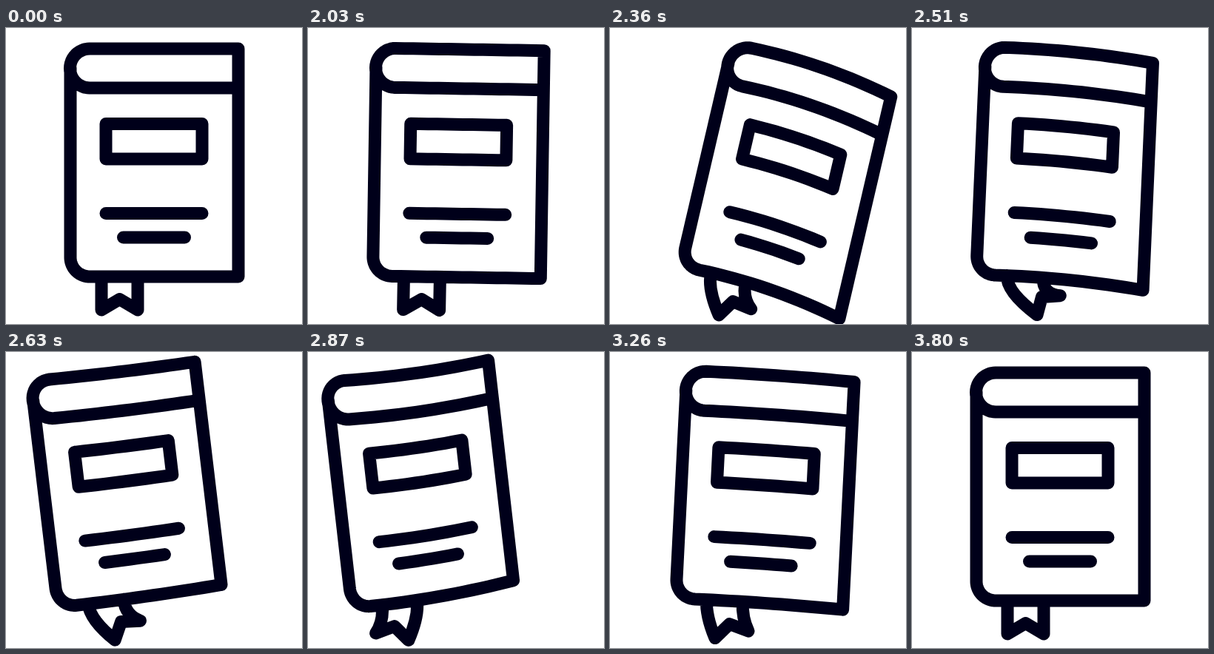
Write an HTML page with a canvas that moves like this. It is 400 by 400 pixels and loops after 3830 ms.

```html
<!DOCTYPE html>
<html lang="en">
<head>
<meta charset="utf-8">
<title>Swinging book</title>
<style>
html, body { margin: 0; width: 100%; height: 100%; overflow: hidden; background: #fff; }
canvas { display: block; width: 400px; height: 400px; }
</style>
</head>
<body>
<canvas id="stage" width="400" height="400"></canvas>
<script>
const ctx = document.getElementById('stage').getContext('2d');
const LOOP = 3830, START = 2030, STEP = 30;
const RAD = Math.PI / 180;
const PIVOT = { x: 151, y: 368 };
const FOOT = { x: 87, y: 310 }, WIDTH = 227, HEIGHT = 308;

// Turning points of each motion: [time, value]
const SWING = [[1975, 0], [2310, 14], [2710, -9], [3240, 2.9], [3640, 0]];
const DRIFT = [[2450, 0], [2800, -26], [3240, 0]];
const RIBBON = [[2000, 0], [2180, 16], [2560, -42], [2940, 17], [3280, -12], [3620, 0]];

// Glides from one turning point to the next
function follow(track, t) {
  const i = track.findIndex(([time]) => time > t);
  if (i < 0) return track[track.length - 1][1];
  if (i === 0) return track[0][1];
  const [t0, a] = track[i - 1], [t1, b] = track[i];
  return a + (b - a) * (1 - Math.cos(Math.PI * (t - t0) / (t1 - t0))) / 2;
}

function arc(cx, cy, r, from, to) {
  return Array.from({ length: 25 }, (_, i) => {
    const a = (from + (to - from) * i / 24) * RAD;
    return [cx + r * Math.cos(a), cy + r * Math.sin(a)];
  });
}

// Cover lines, at rest
const LINES = [
  [[314, 336], [314, 28], ...arc(113, 54.5, 26.5, 270, 90), [314, 81]],
  [[87, 54], ...arc(113, 310, 26, 180, 90), [314, 336]],
  [[135, 129.5], [265, 129.5], [265, 177], [135, 177], [135, 129.5]],
  [[135, 250.5], [265, 250.5]],
  [[158.5, 283], [241.5, 283]]
];

function draw(t) {
  const angle = follow(SWING, t), ribbon = follow(RIBBON, t), drift = follow(DRIFT, t);
  const sin = Math.sin(angle * RAD), cos = Math.cos(angle * RAD);
  // The loose side of the cover trails the spine and turns away while drifting
  const bend = follow(SWING, t - 60) * 4.5e-5;
  const turn = -drift / 26;
  const narrow = (Math.abs(angle) * 0.2 + turn * 5) / WIDTH;
  const taper = turn * 9 / HEIGHT / WIDTH;

  const warp = (px, py) => {
    const dx = px - FOOT.x, dy = py - FOOT.y;
    const x = px - dx * narrow - PIVOT.x;
    const y = py - dy * dx * taper + bend * dx * (dx - 86) - PIVOT.y;
    return [
      PIVOT.x + drift + x * cos - y * sin,
      PIVOT.y - drift * 0.1 + x * sin + y * cos
    ];
  };

  const trace = points => {
    ctx.moveTo(...warp(...points[0]));
    for (let i = 1; i < points.length; i++) {
      const [x0, y0] = points[i - 1], [x1, y1] = points[i];
      const n = Math.ceil(Math.hypot(x1 - x0, y1 - y0) / 12);
      for (let j = 1; j <= n; j++) {
        ctx.lineTo(...warp(x0 + (x1 - x0) * j / n, y0 + (y1 - y0) * j / n));
      }
    }
  };

  const traceRibbon = () => {
    const left = warp(129, 336), right = warp(178, 336);
    const s = Math.sin(ribbon * RAD), c = Math.cos(ribbon * RAD);
    const curl = Math.abs(ribbon - angle);
    const length = 45 + curl * 0.12, half = 24.5 - curl * 0.1;
    const midX = (left[0] + right[0]) / 2, midY = (left[1] + right[1]) / 2;
    const at = (x, y) => [midX + x * c - y * s, midY + x * s + y * c];
    const below = ([x, y]) => [x - 22 * sin, y + 22 * cos];
    ctx.moveTo(...left);
    ctx.quadraticCurveTo(...below(left), ...at(-half, length));
    ctx.lineTo(...at(0, length - 14.5));
    ctx.lineTo(...at(half, length));
    ctx.quadraticCurveTo(...below(right), ...right);
  };

  ctx.fillStyle = '#fff';
  ctx.fillRect(0, 0, 400, 400);
  ctx.strokeStyle = '#00001a';
  ctx.lineWidth = 17;
  ctx.lineCap = ctx.lineJoin = 'round';
  ctx.beginPath();
  LINES.forEach(trace);
  traceRibbon();
  ctx.stroke();
}

const origin = performance.now();
function frame() {
  const t = (performance.now() - origin) % LOOP;
  draw(t < START ? 0 : START + Math.floor((t - START) / STEP) * STEP);
  requestAnimationFrame(frame);
}
frame();
</script>
</body>
</html>
```
